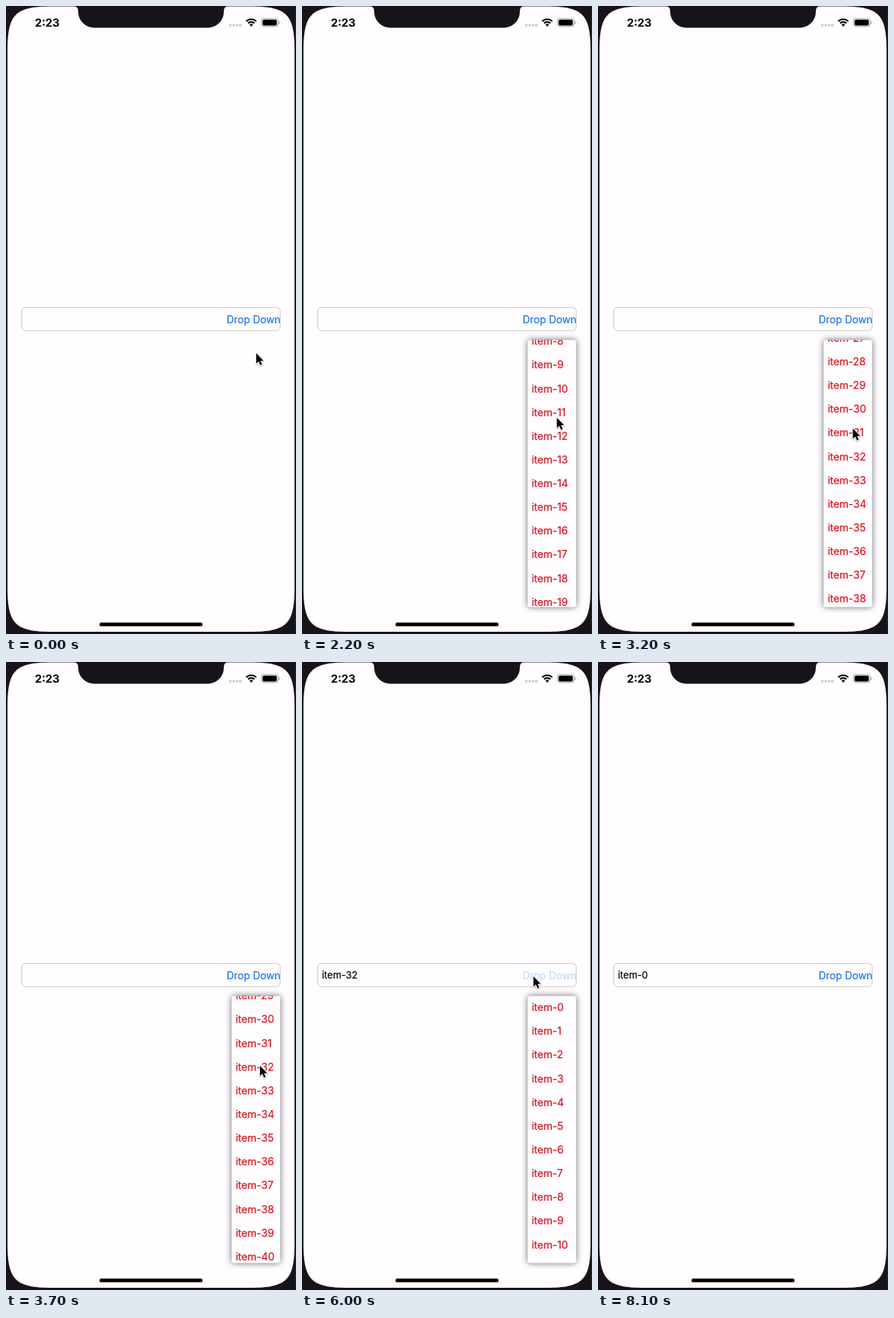
An HTML page with a canvas for the animation above (9800 ms loop, 394 px wide and 851 px high).

```html
<!DOCTYPE html>
<html lang="en">
<head>
<meta charset="utf-8">
<style>
html, body { margin: 0; width: 100%; height: 100%; overflow: hidden; background: #161418; }
canvas { display: block; width: 394px; height: 851px; }
</style>
</head>
<body>
<canvas id="stage"></canvas>
<script>
const LOOP = 9800, W = 394, H = 851, ROW = 32.13;
const FONT = 'Inter, Roboto, "Liberation Sans", sans-serif';
const canvas = document.getElementById('stage');
const c = canvas.getContext('2d');
const dpr = window.devicePixelRatio || 1;
canvas.width = W * dpr;
canvas.height = H * dpr;

// All times are in seconds.
const SESSIONS = [
  { open: 0.9, release: 0.95, close: 4.4, pick: 'item-32' },
  { open: 5.8, release: 6, close: 7.5, pick: 'item-0' }
];
const HOME = { x: 340, y: 470.5 };
const POINTER_END = 8.1;
const MOVES = [
  { from: 0, to: 0.7, x: 326, y: 427 },
  { from: 1, to: 1.8, x: 349, y: 600 },
  { from: 1.8, to: 2.3, x: 346, y: 553 },
  { from: 2.3, to: 2.6, x: 348, y: 606 },
  { from: 2.6, to: 3.7, x: 345, y: 547 },
  { from: 4.7, to: 5.2, x: 260, y: 446 },
  { from: 5.2, to: 5.7, x: 314.5, y: 426 },
  { from: 6, to: 6.5, x: 357, y: 508 },
  { from: 6.8, to: 7.4, x: 326, y: 464 },
  { from: 7.6, to: 8.1, x: 300, y: 371 }
];

const ramp = (t, a, b) => Math.min(1, Math.max(0, (t - a) / (b - a)));
const smooth = p => p * p * (3 - 2 * p);
const pulse = (t, on, rise, off, fall) => ramp(t, on, on + rise) * (1 - ramp(t, off, off + fall));

// Distance covered by a list that was flicked and slows down.
const flick = (t, start, distance) => distance * (1 - Math.exp(-Math.max(0, t - start) / 0.3));
const scrollAt = t => t < 5 ? Math.min(948, flick(t, 1.8, 368) + flick(t, 2.57, 594)) : 0;

function pointerAt(t) {
  let { x, y } = HOME;
  for (const m of MOVES) {
    const p = smooth(ramp(t, m.from, m.to));
    x += (m.x - x) * p;
    y += (m.y - y) * p;
  }
  return [x, y];
}

function box(x, y, w, h, r) {
  c.beginPath();
  c.roundRect(x, y, w, h, r);
}

// Rectangle whose corners curve gradually into the sides.
function softBox(x, y, w, h, reach, pull) {
  c.beginPath();
  for (const [sx, sy] of [[1, 1], [-1, 1], [-1, -1], [1, -1]]) {
    const cx = sx > 0 ? x : x + w, cy = sy > 0 ? y : y + h;
    const side = d => [cx, cy + sy * d], level = d => [cx + sx * d, cy];
    const [a, b] = sx === sy ? [side, level] : [level, side];
    c.lineTo(...a(reach));
    c.bezierCurveTo(...a(pull), ...b(pull), ...b(reach));
  }
  c.closePath();
}

function text(str, x, y, size, color, weight = 400) {
  c.font = `${weight} ${size}px ${FONT}`;
  c.fillStyle = c.strokeStyle = color;
  c.lineWidth = 0.2;
  c.fillText(str, x, y);
  c.strokeText(str, x, y);
}

function phone() {
  c.fillStyle = '#161418';
  c.fillRect(0, 0, W, H);
  c.fillStyle = '#4a141c';
  c.fillRect(393, 0, 1, H);
  c.fillStyle = '#fffdff';
  softBox(2, 0.5, 390, 847.5, 60, 10.5);
  c.fill();

  c.fillStyle = '#161418';
  c.fill(new Path2D('M92 0A6 6 0 0 1 98 6V7.5A22 22 0 0 0 120 29.5H274A22 22 0 0 0 296 7.5V6A6 6 0 0 1 302 0Z'));
  c.fillStyle = '#000';
  box(127, 835.5, 140, 5, 2.5);
  c.fill();
}

function statusBar() {
  text('2:23', 39.3, 28, 15.2, '#000', 600);
  c.fillStyle = '#c9c7cb';
  for (let i = 0; i < 4; i++) {
    c.beginPath();
    c.arc(304.7 + i * 4.6, 26, 1.8, 0, 7);
    c.fill();
  }

  // Wi-Fi fan
  c.strokeStyle = c.fillStyle = '#000';
  c.lineWidth = 2.2;
  for (const r of [6, 9.6]) {
    c.beginPath();
    c.arc(333.2, 27.6, r, -Math.PI * 0.75, -Math.PI * 0.25);
    c.stroke();
  }
  c.beginPath();
  c.moveTo(333.2, 28);
  c.arc(333.2, 27.6, 3.4, -Math.PI * 0.75, -Math.PI * 0.25);
  c.fill();

  // Battery
  c.strokeStyle = '#a5a3a7';
  c.lineWidth = 1;
  box(347, 17, 22.5, 11, 3);
  c.stroke();
  box(348.6, 18.6, 19.3, 7.8, 1.7);
  c.fill();
  c.fillStyle = '#a5a3a7';
  box(370.4, 20.6, 1.4, 4, 1);
  c.fill();
}

function field(value, opacity) {
  c.strokeStyle = '#c8c6ca';
  c.lineWidth = 1;
  box(21.5, 408.5, 351, 31.5, 4.5);
  c.stroke();
  text(value, 26.9, 429, 13.2, '#000');
  c.globalAlpha = opacity;
  text('Drop Down', 299.8, 430, 13.85, '#1a78ea');
  c.globalAlpha = 1;
}

function popup(opacity, scroll) {
  if (!opacity) return;
  const scale = 0.9 + 0.1 * opacity, mx = 339.5, my = 633.5;
  c.save();
  c.globalAlpha = opacity;
  c.translate(mx, my);
  c.scale(scale, scale);
  c.translate(-mx, -my);

  c.save();
  c.shadowColor = 'rgba(0,0,0,.6)';
  c.shadowBlur = 8 * dpr;
  c.fillStyle = '#fffdff';
  box(306.5, 452.5, 66, 362, 3.5);
  c.fill();
  c.restore();

  c.clip();
  const first = Math.max(0, Math.floor(scroll / ROW) - 1);
  for (let n = first; n < first + 14; n++)
    text('item-' + n, 311.9, 473.2 + n * ROW - scroll, 14.1, '#d9131f');
  c.restore();
}

function pointer(x, y) {
  const arrow = new Path2D('M0 0V14L3.2 11L5.6 16.3L7.9 15.3L5.6 10.2H9.9Z');
  c.save();
  c.translate(x, y);
  c.lineJoin = 'round';
  c.shadowColor = 'rgba(0,0,0,.3)';
  c.shadowBlur = 2 * dpr;
  c.shadowOffsetY = dpr;
  c.strokeStyle = '#fff';
  c.lineWidth = 1.8;
  c.stroke(arrow);
  c.shadowColor = 'transparent';
  c.fillStyle = '#000';
  c.fill(arrow);
  c.restore();
}

function draw(now) {
  const t = Math.floor((now % LOOP) / 100) / 10;
  let value = '', dim = 0, shown = 0;
  for (const s of SESSIONS) {
    if (t > s.close) value = s.pick;
    dim += pulse(t, s.open - 0.1, 0.1, s.release, 0.2);
    shown += pulse(t, s.open, 0.2, s.close, 0.2);
  }

  c.setTransform(dpr, 0, 0, dpr, 0, 0);
  phone();
  statusBar();
  field(value, 1 - 0.77 * dim);
  popup(shown, scrollAt(t));
  if (t < POINTER_END) pointer(...pointerAt(t));
}

const start = performance.now();
function tick() {
  draw(performance.now() - start);
  requestAnimationFrame(tick);
}
tick();
</script>
</body>
</html>
```
